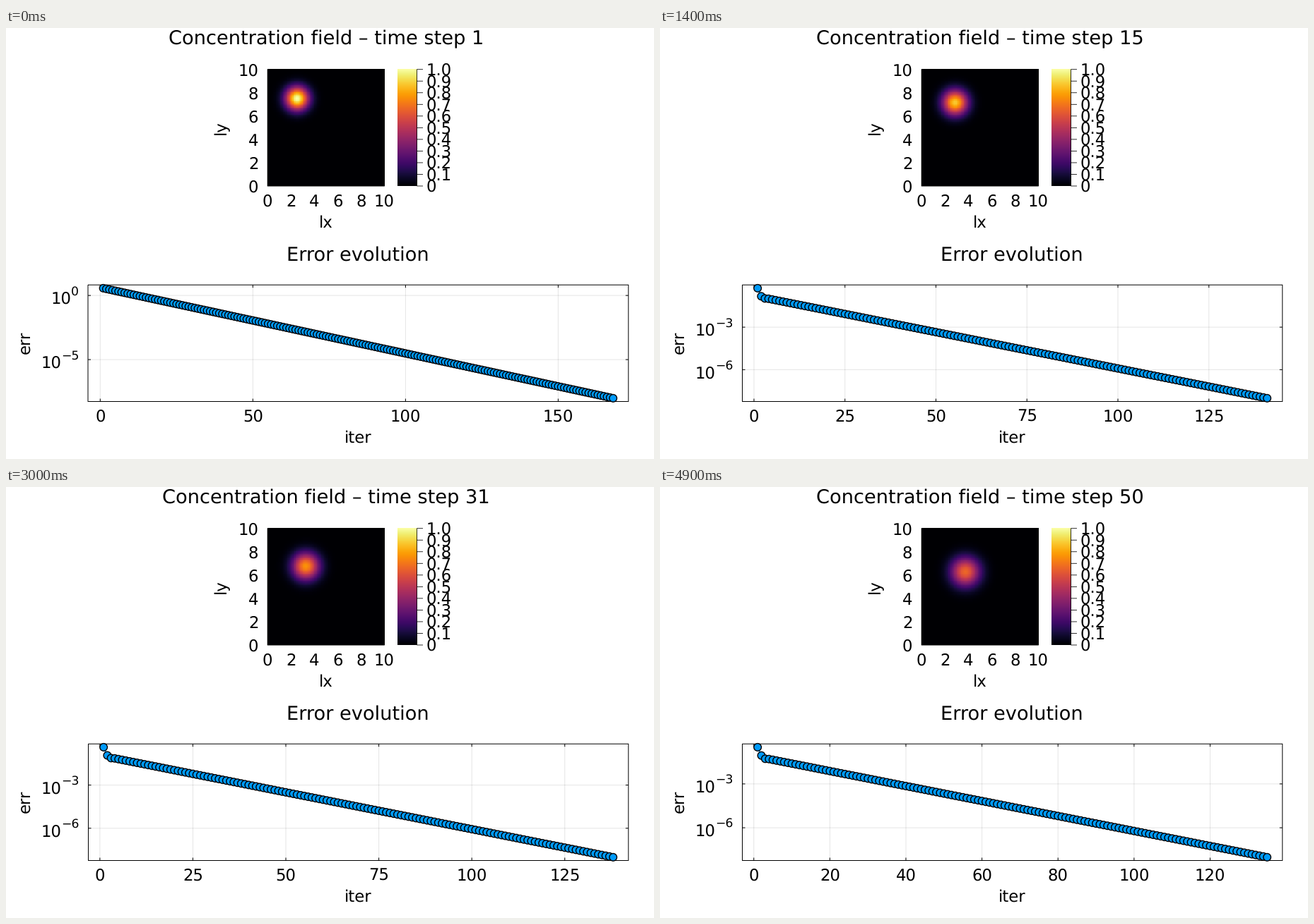
Recreate the animation shown at these times as a matplotlib script. Size 917x611 px, loop 5 s.

```python
import numpy as np
import matplotlib.pyplot as plt
from matplotlib.animation import FuncAnimation

W, H, DPI = 917, 611, 64
PT = 72 / DPI                      # points per pixel
STEPS, INTERVAL = 50, 100
TITLE, LABEL, SUPER = 27.25, 22.8, 17.2
SPREAD = 0.0105                    # widening of the plume per time step
SHIFT = 0.025                      # travel of the plume per time step

plt.rcParams.update({"font.family": "DejaVu Sans", "text.hinting": "none",
                     "toolbar": "None"})
fig = plt.figure(figsize=(W / DPI, H / DPI), dpi=DPI, facecolor="white")
ax = fig.add_axes([0, 0, 1, 1])


def label(x, y, text, px=LABEL, ha="center", **kw):
    return ax.text(x, y, text, fontsize=px * PT, ha=ha, va="baseline", **kw)


def line(xs, ys, width=1.0, **kw):
    kw.setdefault("color", "black")
    return ax.plot(xs, ys, lw=width * PT, solid_capstyle="butt",
                   snap=False, **kw)[0]


def box(x0, x1, y0, y1):
    return line([x0, x1, x1, x0, x0], [y0, y0, y1, y1, y0], zorder=4)


# Concentration map and colour bar
MX0, MX1, MY0, MY1 = 370.2, 535.4, 58.7, 224.0
BX0, BX1 = 554, 581.4
cells = (np.arange(100) + 0.5) / 10
gx, gy = np.meshgrid(cells, cells)


def concentration(step):
    spread = 1 + SPREAD * (step - 1)
    cx, cy = 2.5 + SHIFT * step, 7.5 - SHIFT * step
    return np.exp(-((gx - cx) ** 2 + (gy - cy) ** 2) / spread) / spread


def picture(data, x0, x1):
    return ax.imshow(data, extent=(x0, x1, MY1, MY0), origin="lower",
                     cmap="inferno", vmin=0, vmax=1, aspect="auto",
                     interpolation="nearest")


def draw_static():
    box(MX0, MX1, MY0, MY1)
    for v in range(0, 11, 2):
        f = v / 10
        label(MX0 + f * (MX1 - MX0), 253, str(v))
        label(357.3, MY1 - f * (MY1 - MY0) + 8.7, str(v), ha="right")
    label(452.7, 282.7, "lx")
    label(311.2, 140.8, "ly", rotation=90, rotation_mode="anchor")

    picture(np.linspace(0, 1, 256)[:, None], BX0, BX1)
    line([BX1, BX1], [MY0, MY1], 0.8)
    for i in range(11):
        y = MY1 - i / 10 * (MY1 - MY0)
        line([BX1, 590], [y, y], 0.8)
        label(594.3, y + 8, "0" if i == 0 else f"{i / 10:.1f}", ha="left")

    label(498.3, 329.6, "Error evolution", TITLE)
    label(498.3, 587.7, "iter")
    label(34.9, 446.3, "err", rotation=90, rotation_mode="anchor")


# Error plot
PX1, PY0, PY1 = 880.8, 364.2, 529.5
PAD = 0.03 / 1.06


def log_errors(step):
    """log10 of the residual at every iteration of one time step."""
    if step == 1:
        return np.linspace(0.565, -8.01, 168)
    spread = np.log10(1 + SPREAD * step)
    start = -0.123 - 2 * spread
    knee = -0.81 - 2.57 * spread
    rate = 0.05125
    count = int(np.ceil(3.6 + (8 + knee) / rate))
    n = np.arange(1, count + 1)
    errs = knee - rate * np.maximum(0, n - 3.6)
    errs[:2] = start, start - 0.57
    return errs


def iter_step(count):
    if count > 145:
        return 50
    return 25 if count > 135 else 20


def draw_errors(step):
    errs = log_errors(step)
    count = len(errs)
    left = 116 if step < 14 else 116.5
    px0, px1 = left + PAD * (PX1 - left), PX1 - PAD * (PX1 - left)
    py0, py1 = PY0 + PAD * (PY1 - PY0), PY1 - PAD * (PY1 - PY0)

    def to_x(n):
        return px0 + (n - 1) / (count - 1) * (px1 - px0)

    def to_y(e):
        return py0 + (errs[0] - e) / (errs[0] - errs[-1]) * (py1 - py0)

    made = [box(left, PX1, PY0, PY1)]
    grid = dict(alpha=0.1, zorder=1)

    gap = iter_step(count)
    for n in range(0, count + 4, gap):
        x = to_x(n)
        if x > PX1:
            break
        made += [line([x, x], [PY0, PY1], **grid),
                 line([x, x], [PY1 - 4, PY1]), line([x, x], [PY0, PY0 + 4]),
                 label(x, 557.7, str(n))]

    for power in ((0, -5) if step < 14 else (-3, -6)):
        y = max(to_y(power), PY0)
        base_right = 78 if power else 92.5
        sup = f"\u2212{-power}" if power else "0"
        made += [line([left, PX1], [y, y], **grid),
                 line([left, left + 4], [y, y]), line([PX1 - 4, PX1], [y, y]),
                 label(base_right, y + 12, "10", ha="right"),
                 label(103.2, y - 0.8, sup, SUPER, ha="right")]

    xs, ys = to_x(np.arange(1, count + 1)), to_y(errs)
    made.append(line(xs, ys, 2, color="#009afa", zorder=5))
    # two equal widths keep the markers off the pixel grid
    made.append(ax.scatter(xs, ys, s=(10.6 * PT) ** 2, c="#009afa",
                           edgecolors="black", linewidths=[1.4 * PT] * 2,
                           zorder=6))
    return made


draw_static()
field = picture(concentration(1), MX0, MX1)
title = label(452.9, 23.8, "", TITLE)
dynamic = []


def update(frame):
    step = frame + 1
    while dynamic:
        dynamic.pop().remove()
    field.set_data(concentration(step))
    title.set_text(f"Concentration field \u2013 time step {step}")
    dynamic.extend(draw_errors(step))
    return [field, title, *dynamic]


ax.set_xlim(0, W)
ax.set_ylim(H, 0)
ax.set_autoscale_on(False)
ax.axis("off")

anim = FuncAnimation(fig, update, frames=STEPS, interval=INTERVAL,
                     repeat=True, repeat_delay=0, blit=False)
plt.show()
```
